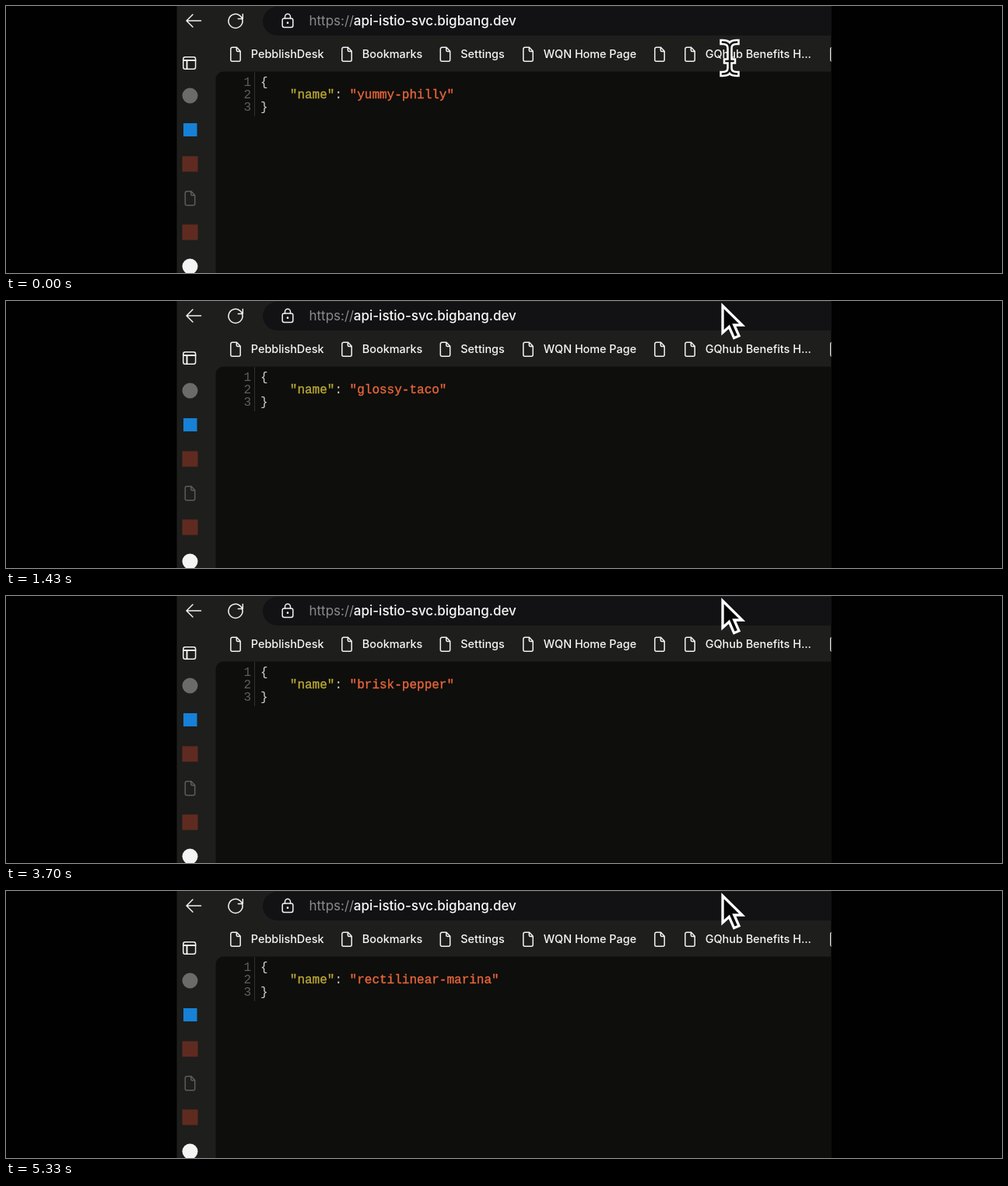
An HTML page that plays this animation: 1280 px wide and 344 px high, repeating every 6500 ms.

```html
<!DOCTYPE html>
<html lang="en">
<head>
<meta charset="utf-8">
<title>Browser refresh</title>
<style>
  html, body { margin: 0; width: 100%; height: 100%; overflow: hidden; background: #010102; }
  svg { display: block; width: 1280px; height: 344px; }
  text { white-space: pre; }
  .ui { font: 500 14.4px Inter, "Open Sans", sans-serif; fill: #f6f6f6; }
  .url { font: 17px Inter, "Open Sans", sans-serif; fill: #f8f8f8; }
  .host { font-weight: 500; }
  .code { font: 16px "Liberation Mono", "Courier New", monospace; fill: #d2d2d0; }
  .key { fill: #bba936; stroke: #bba936; stroke-width: .35; }
  .value { fill: #e8663a; stroke: #e8663a; stroke-width: .35; }
  .num { fill: #5f5f5c; text-anchor: end; }
  .line { fill: none; stroke: #f2f2f2; stroke-width: 1.5; stroke-linecap: round; stroke-linejoin: round; }
</style>
</head>
<body>
<svg viewBox="0 0 1280 344">
  <defs>
    <clipPath id="window"><rect x="219.5" width="841" height="344"/></clipPath>
    <path id="page" d="M2.500 .8H8.500L13.200 5.800V16.700a2 2 0 0 1-2 2H2.800a2 2 0 0 1-2-2V2.800a2 2 0 0 1 2-2M8.300 1V4.500a1.500 1.500 0 0 0 1.500 1.500H13"/>
    <path id="beamShape" d="M921 46.500Q930 46.500 930 54V80Q930 87.500 921 87.500M939 46.500Q930 46.500 930 54M930 80Q930 87.500 939 87.500M925.500 71H934.500"/>
  </defs>
  <g clip-path="url(#window)">
    <rect x="219" width="843" height="344" fill="#1e1e1c"/>
    <path d="M269.500 344V94.500a10 10 0 0 1 10-10H1062V344z" fill="#0e0e0c"/>

    <path class="line" d="M250.500 19H232M240 11L232 19L240 27"/>
    <path id="reload" class="line" d="M303.500 16.500A9 9 0 1 1 300.500 12.300L304 16M304.300 10.500V16.500H298.300"/>
    <path id="stop" class="line" d="M289 13.500L301 25.500M301 13.500L289 25.500"/>

    <rect x="330" y="1" width="780" height="37" rx="18.500" fill="#121214"/>
    <rect id="focus" x="329.500" y="1.200" width="780" height="37.200" rx="18.600" fill="#111113" stroke="#3f8cd8" stroke-width="2.600"/>
    <g class="line">
      <rect x="355.200" y="16" width="13.600" height="11.500" rx="2.200"/>
      <path d="M358.500 16V13.700a3.500 3.500 0 0 1 7 0V16"/>
      <circle cx="362" cy="21.700" r=".6"/>
    </g>
    <rect id="selection" x="389" y="8" width="266" height="23" fill="#23426b"/>
    <text id="scheme" class="url" x="389.500" y="25.300">https://</text>
    <text class="url host" x="446.800" y="25.300">api-istio-svc.bigbang.dev</text>

    <g id="bookmarks"></g>

    <g class="line">
      <rect x="227.800" y="65.800" width="15.800" height="15.400" rx="2.500"/>
      <path d="M228 70H243.500M232.500 70V81" stroke-width="2"/>
    </g>
    <circle cx="236.500" cy="115.500" r="10" fill="#6b6b6a"/>
    <rect x="228" y="151" width="17.500" height="17" fill="#1681d6"/>
    <rect x="226.500" y="193.500" width="20" height="20" fill="#5f2b20"/>
    <use href="#page" class="line" x="229.500" y="238" style="stroke:#5c5c5a"/>
    <rect x="226.500" y="281.500" width="20" height="20" fill="#5f2b20"/>
    <circle cx="236.500" cy="335.500" r="10" fill="#f4f4f4"/>

    <path d="M319.500 85V142" stroke="#30302e"/>
    <g class="code">
      <text class="num" x="315" y="103">1</text>
      <text class="num" x="315" y="119">2</text>
      <text class="num" x="315" y="135">3</text>
      <text x="327" y="103">{</text>
      <text x="364.800" y="118.700"><tspan class="key">"name"</tspan>: <tspan id="value" class="value"></tspan></text>
      <text x="327" y="135">}</text>
    </g>

    <g id="beam" fill="none" stroke-linecap="square">
      <use href="#beamShape" stroke="#fff" stroke-width="7.500"/>
      <use href="#beamShape" stroke="#111" stroke-width="2.500"/>
    </g>
    <path id="arrow" d="M1 4.200V38.800L9.300 31.300L15.600 45.700L22 43L15.800 29H26.200z" fill="#050505" stroke="#fff" stroke-width="3.300"/>
  </g>
</svg>
<script>
  const LOOP = 6500, BLUR = 1330;
  const $ = id => document.getElementById(id);

  const bookmarks = [
    [288, "PebblishDesk"], [431, "Bookmarks"], [557.5, "Settings"], [664, "WQN Home Page"],
    [833, ""], [872, "GQhub Benefits H..."], [1059, ""]
  ];
  $("bookmarks").innerHTML = bookmarks.map(([x, label]) =>
    `<use href="#page" class="line" x="${x}" y="52.5"/><text class="ui" x="${x + 26.8}" y="67">${label}</text>`
  ).join("");

  // Each refresh: loading starts, new name arrives, loading ends
  const refreshes = [
    [1330, 1380, 1430, "glossy-taco"],
    [2730, 2770, 2840, "mellow-harbor"],
    [2905, 2945, 3015, "crimson-lantern"],
    [3085, 3125, 3195, "rigid-branch"],
    [3260, 3300, 3360, "quick-saddle"],
    [3430, 3470, 3530, "copper-thicket"],
    [3600, 3640, 3700, "brisk-pepper"],
    [3770, 3810, 3870, "silent-walnut"],
    [3940, 3975, 4030, "lazy-kiosk"],
    [4100, 4130, 4200, "humble-garnet"],
    [4300, 4330, 4400, "distant-feather"],
    [4500, 4530, 4600, "sunny-cradle"],
    [4690, 4730, 4800, "careful-analog"],
    [4880, 4920, 4990, "plain-orchid"],
    [5060, 5100, 5170, "wooden-signal"],
    [5230, 5270, 5330, "rectilinear-marina"]
  ];

  const show = (id, on) => $(id).setAttribute("visibility", on ? "visible" : "hidden");
  const ease = p => p * p * (3 - 2 * p);

  function draw(t) {
    let name = "yummy-philly", loading = false;
    for (const [start, arrive, end, next] of refreshes) {
      if (t >= arrive) name = next;
      if (t >= start && t < end) loading = true;
    }
    $("value").textContent = `"${name}"`;
    show("stop", loading);
    show("reload", !loading);

    const selected = t >= 560 && t < BLUR;
    show("focus", t >= 400 && t < BLUR);
    show("selection", selected);
    $("scheme").style.fill = selected ? "#f8f8f8" : "#8a8a8c";

    const p = ease(Math.min(1, Math.max(0, (t - 60) / 300)));
    const isBeam = t < 100;
    show("beam", isBeam);
    show("arrow", !isBeam);
    $("beam").setAttribute("transform", `translate(${-10 * p} ${-63 * p})`);
    $("arrow").setAttribute("transform", `translate(${930 - 10 * p} ${65 - 63 * p})`);
  }

  const begin = performance.now();
  function tick() {
    draw((performance.now() - begin) % LOOP);
    requestAnimationFrame(tick);
  }
  draw(0);
  requestAnimationFrame(tick);
</script>
</body>
</html>
```
